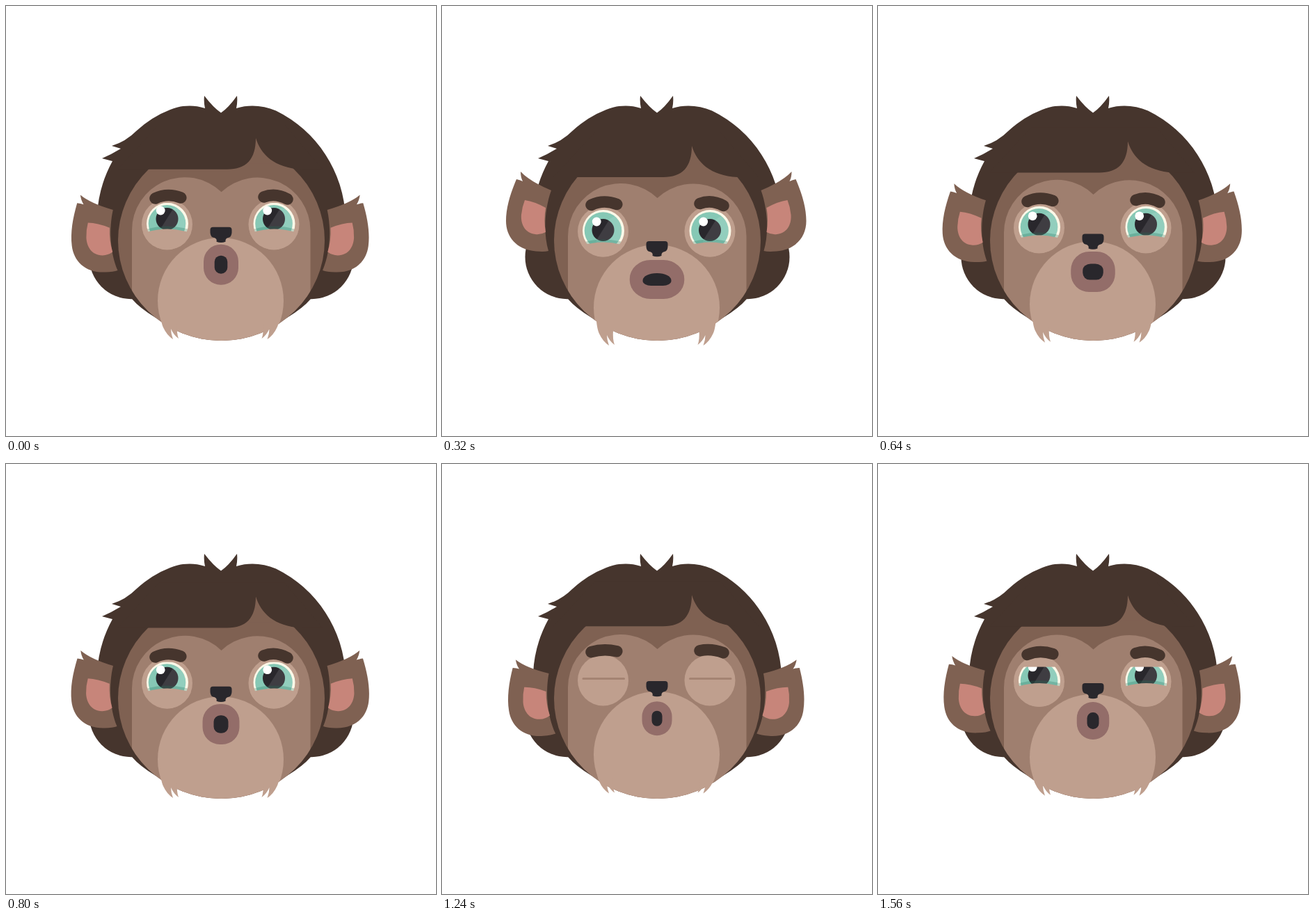
Animation, 618 px wide and 618 px high, one loop 1600 ms. Source, as an HTML page:

```html
<!DOCTYPE html>
<html lang="en">
<head>
<meta charset="utf-8">
<title>Surprised monkey</title>
<style>
  html, body { margin: 0; height: 100%; overflow: hidden; background: #fff; }
  svg { display: block; width: 100vw; height: 100vh; }
  .hair { fill: #46352d; }
  .skin { fill: #7f6152; }
  .mask { fill: #9f7f6f; }
  .pale { fill: #bf9f8e; }
  .dark { fill: #29272c; }
  .brow { fill: none; stroke: #46352d; stroke-width: 16.5; stroke-linecap: round; }
</style>
</head>
<body>
<svg viewBox="0 0 618 618">
  <defs>
    <clipPath id="face"><ellipse cx="309.5" cy="337" rx="148.5" ry="144"/></clipPath>
    <clipPath id="patch"><circle cx="231.5" cy="0" r="36.5"/></clipPath>
    <clipPath id="ball"><circle cx="232" cy="-1" r="30"/></clipPath>
    <g id="ear">
      <path class="skin" d="M113 238Q126 252 157 265C148 290 145 325 153 352Q147 353.5 135 352.5C106 350 92 331 92 309C92 290 98 270 107 249Q112 250 116 252Q113 246 113 238Z"/>
      <path fill="#c7857a" d="M119 279Q133 281 149 290Q146 308 149 325Q142 329 134 328C118 326 113 312 114 300Q115 289 119 279Z"/>
    </g>
    <path id="tuft" class="pale" d="M221 440Q222 463 226 471Q231 482 240 488Q237 480 237 473Q241 482 248 487Q245 479 246 466L246 440Z"/>
    <g id="eye">
      <circle class="pale" cx="231.5" r="36.5"/>
      <g id="open">
        <circle cx="232" cy="-1" r="30" fill="#fcf8e8"/>
        <circle cx="231.5" cy="-1" r="26.8" fill="#86c8b5"/>
        <circle id="pupil" class="dark" cx="231.5" r="16"/>
        <path id="shine" fill="#fff" fill-opacity=".1"/>
        <circle id="glint" cx="222.2" r="6.4" fill="#fff"/>
        <path id="shade" clip-path="url(#ball)" fill="none" stroke="#1f6f58" stroke-opacity=".27" stroke-width="8"/>
        <g clip-path="url(#patch)">
          <path id="lower" class="pale"/>
          <rect id="upper" class="pale" x="190" y="-60" width="84"/>
        </g>
      </g>
      <path id="crease" d="M203 0H261.5" stroke="#a48372" stroke-width="3" stroke-linecap="round"/>
    </g>
  </defs>

  <g class="hair">
    <path d="M309 153.5Q320 146 332 129Q333 138 331 147C350 141 370 143 388 150.5A179 179 0 0 1 488 305L487 350L438 421Q427 434 404 448H215Q192 434 181 421L131 350V300A179 179 0 0 1 153 223L138 219Q152 213 165 205L152 201Q172 195 188 179Q210 159 236 149C251 143 268 141 286 147Q284 138 285 129Q298 146 309 153.5Z"/>
    <circle cx="180" cy="360.7" r="60.5"/>
    <circle cx="439" cy="360.7" r="60.5"/>
  </g>
  <g id="earL"><use href="#ear"/></g>
  <g transform="translate(615.5) scale(-1 1)"><g id="earR"><use href="#ear"/></g></g>

  <g clip-path="url(#face)">
    <rect class="skin" x="150" y="180" width="320" height="310"/>
    <path id="heart" class="mask" d="M181 490V76A76 76 0 0 1 309.5 21A76 76 0 0 1 437.5 76V490Z"/>
    <circle id="muzzle" class="pale" cx="308.5" r="90.5"/>
  </g>
  <g id="fringe">
    <path class="skin" d="M340 -8V-45H385V-8Z"/>
    <path class="hair" d="M160 0H318C345 0 359 -14 359 -45C366 -22 385 -2 425 0H455L400 -65H220Z"/>
  </g>
  <g id="tufts">
    <use href="#tuft"/>
    <use href="#tuft" transform="translate(615.5) scale(-1 1)"/>
  </g>

  <g id="eyes">
    <use href="#eye"/>
    <use href="#eye" x="153.5"/>
  </g>
  <path id="brows" class="brow"/>
  <path id="nose" class="dark" d="M297.5 0H320.5Q324.5 0 324.5 4V8Q324 14 320 15C316.5 15.5 315 17.5 315.5 21Q309 23.5 302.5 21C303.5 17.5 301.5 15.5 298 15Q294 14 293.5 8V4Q293.5 0 297.5 0Z"/>
  <path id="lips" fill="#936d69"/>
  <path id="gap" class="dark"/>
</svg>
<script>
const LOOP = 1600, STEP = 40;
const $ = id => document.getElementById(id);
const set = (id, attrs) => { for (const k in attrs) $(id).setAttribute(k, attrs[k]); };
const moveY = (id, y) => set(id, { transform: `translate(0 ${y})` });

// Monotone cubic through [time, value] knots
function curve(...p) {
  const slope = p.slice(1).map((q, i) => (q[1] - p[i][1]) / (q[0] - p[i][0]));
  const tan = p.map((_, i) => {
    const a = slope[i - 1], b = slope[i];
    return a * b > 0 ? 2 * a * b / (a + b) : 0;
  });
  return t => {
    let i = 0;
    while (i < p.length - 2 && t > p[i + 1][0]) i++;
    const h = p[i + 1][0] - p[i][0], s = (t - p[i][0]) / h, r = 1 - s;
    return p[i][1] * r * r * (1 + 2 * s) + p[i + 1][1] * s * s * (3 - 2 * s)
      + h * s * r * (tan[i] * r - tan[i + 1] * s);
  };
}

// Linear blend of values posed at these amounts of surprise
const POSES = [0, .12, .22, .6, 1];
function pose(w, ...v) {
  let i = 0;
  while (i < 3 && w > POSES[i + 1]) i++;
  return v[i] + (v[i + 1] - v[i]) * (w - POSES[i]) / (POSES[i + 1] - POSES[i]);
}

const surprise = curve([-360, 0], [-40, .12], [0, .22], [150, 1], [500, 1], [560, .88],
  [640, .6], [960, .12], [1240, 0], [1560, .12], [1600, .22], [1750, 1]);
const lidOpen = curve([0, 1], [760, 1], [960, .27], [1120, 0], [1360, 0], [1560, .67], [1600, 1]);
const cheek = curve([0, 1.5], [160, 0], [480, 3], [640, 1.5], [1600, 1.5]);

// Rounded box with separate top (a) and bottom (b) corner radii
function box(cy, w, h, ax, ay, bx, by) {
  const l = 309 - w / 2, r = 309 + w / 2, t = cy - h / 2, b = cy + h / 2;
  return `M${l} ${t + ay}A${ax} ${ay} 0 0 1 ${l + ax} ${t}H${r - ax}A${ax} ${ay} 0 0 1 ${r} ${t + ay}`
    + `V${b - by}A${bx} ${by} 0 0 1 ${r - bx} ${b}H${l + bx}A${bx} ${by} 0 0 1 ${l} ${b - by}Z`;
}

function drawEyes(t, w) {
  const y = 311 + 13 * w, open = lidOpen(t), closed = open < .03;
  const pupil = 301.5 + 20.5 * w - y;
  const low = pose(w, 311.5, 316.5, 322, 331, 341) - y;
  const edge = low + 3, ctrl = 2 * (low - cheek(t)) - edge;
  const lid = `M202 ${edge}Q232 ${ctrl} 262 ${edge}`;
  moveY('eyes', y);
  set('pupil', { cy: pupil });
  set('glint', { cy: pupil - 12 });
  set('shine', { d: `M241 ${pupil - 16}L221 ${pupil + 16}L230 25.8A26.8 26.8 0 0 0 248 -22Z` });
  set('shade', { d: lid });
  set('lower', { d: `${lid}H275V60H190V${edge}Z` });
  set('upper', { height: Math.max(0, 283 + 26 * (1 - open) - y + 60) });
  set('open', { visibility: closed ? 'hidden' : 'visible' });
  set('crease', { visibility: closed ? 'visible' : 'hidden', transform: `translate(0 ${308.5 - y})` });
}

function drawMouth(w) {
  const cy = 365.7 + 27.3 * w;
  const lw = pose(w, 43, 46.5, 50, 63.5, 78.5), lh = pose(w, 49, 54, 58, 58, 56);
  const rx = pose(w, 21.4, 23, 24.5, 26, 30), ry = pose(w, 21.4, 23, 24.5, 26, 27);
  set('lips', { d: box(cy, lw, lh, rx, ry, rx, ry) });

  const gw = pose(w, 15, 17, 18.6, 29.5, 41), gh = pose(w, 22, 24, 26, 23, 18);
  const corner = (open, wide) => pose(w, 7.4, 8.3, 9, open, wide);
  set('gap', { d: box(cy, gw, gh, corner(11.5, 20), corner(9.5, 10.5), corner(10, 12), corner(10, 7)) });
}

function draw(t) {
  const w = surprise(t);
  const scalp = w ** 1.4;
  const jaw = pose(w, 0, .23, .38, .7, 1);
  const turn = `rotate(${-9 * (1 - w)} 384 305)`;
  const arch = pose(w, 7.5, 5.5, 4.5, 4.5, 4.5);

  set('earL', { transform: turn });
  set('earR', { transform: turn });
  moveY('fringe', 233.2 + 12.8 * scalp);
  moveY('heart', 245 + 10 * scalp);
  set('muzzle', { cy: 417.5 + 16 * jaw });
  moveY('tufts', -14.5 * (1 - jaw));
  set('brows', { d: `M214.5 13Q232 ${arch} 251.3 12M370.5 11Q387 ${arch} 404.5 14` });
  moveY('brows', pose(w, 257.2, 261, 263.5, 268, 273));
  moveY('nose', 312 + 26 * w);
  drawEyes(t, w);
  drawMouth(w);
}

function tick() {
  const t = performance.now() % LOOP;
  draw(Math.floor(t / STEP) * STEP);
  requestAnimationFrame(tick);
}
tick();
</script>
</body>
</html>
```
